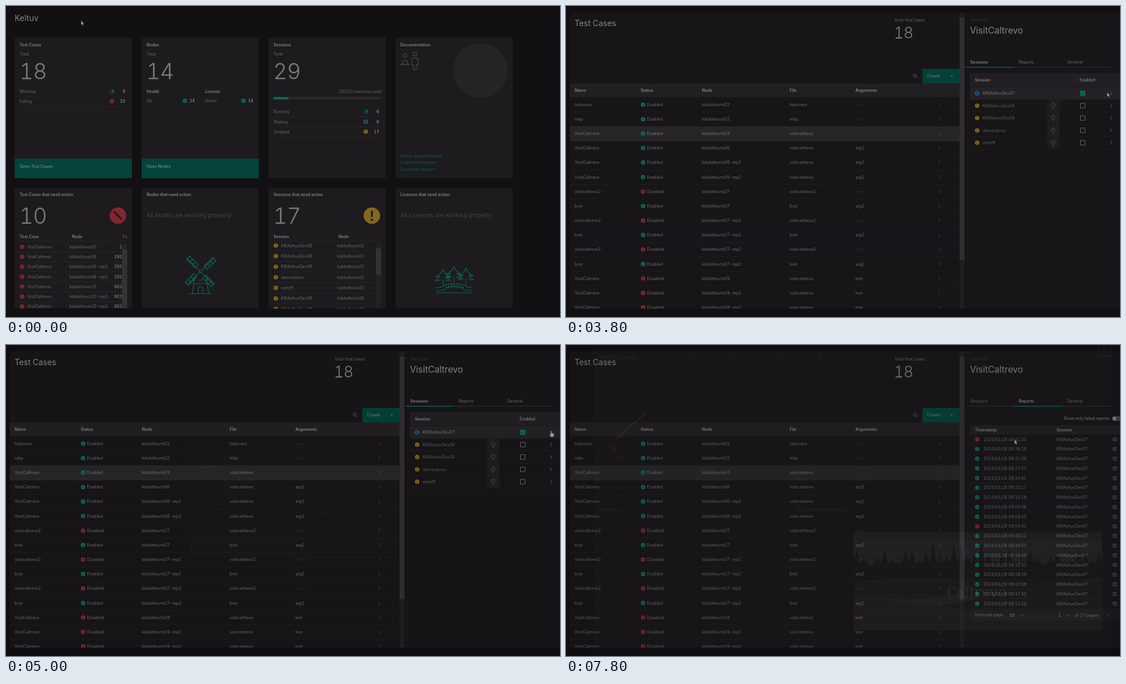
These frames come from a looping animation (960 by 540 pixels, 8 s). An HTML page:

```html
<!DOCTYPE html>
<html lang="en">
<head>
<meta charset="utf-8">
<title>Test case dashboard</title>
<style>
html, body { margin: 0; width: 100%; height: 100%; overflow: hidden; background: #110f12; }
svg { display: block; width: 100vw; height: 100vh; }
text { font-family: Inter, Roboto, sans-serif; font-variant-numeric: tabular-nums; white-space: pre; }
</style>
</head>
<body>
<svg id="stage" viewBox="0 0 960 540" preserveAspectRatio="none"></svg>
<script>
const C = {
  outer: '#110f12', page: '#171518', card: '#1d1b1e', head: '#211f22', line: '#211f22', hover: '#272528',
  grey: '#363437', text: '#6a686b', bright: '#868487', figure: '#7d7b7e', dim: '#464447', faint: '#2c2a2d',
  tile: '#04443a', green: '#044036', onGreen: '#6f827e', mint: '#0b6b53', red: '#84262f', gold: '#83691f', blue: '#2b618f'
};

const rect = (x, y, w, h, fill, extra = '') =>
  `<rect x="${x}" y="${y}" width="${w}" height="${h}" fill="${fill}" ${extra}/>`;
const dot = (x, y, r, fill) => `<circle cx="${x}" cy="${y}" r="${r}" fill="${fill}"/>`;
const path = (d, color, w = 0.8) => `<path d="${d}" fill="none" stroke="${color}" stroke-width="${w}"/>`;
const hline = (x1, x2, y, color = C.line, w = 0.8) => path(`M${x1} ${y}H${x2}`, color, w);

// y is the middle of the capitals
function text(x, y, s, { size = 7.2, fill = C.text, weight = 400, anchor = 'start', extra = '' } = {}) {
  return `<text x="${x}" y="${(y + size * 0.36).toFixed(2)}" font-size="${size}" fill="${fill}" ` +
    `font-weight="${weight}" text-anchor="${anchor}" ${extra}>${s}</text>`;
}
const bold = (x, y, s, opt = {}) => text(x, y, s, { size: 7, weight: 600, fill: C.bright, ...opt });

// large light figure; every 1 stands on a foot
function figure(x, y, s, size) {
  const step = size * 0.585, foot = y + size * 0.345;
  let out = text(x, y, s, { size, weight: 300, fill: C.figure, extra: 'letter-spacing="-.025em"' });
  [...s].forEach((c, i) => {
    const mid = x + step * i + size * 0.32;
    if (c === '1') out += hline(mid - size * 0.19, mid + size * 0.2, foot, C.figure, size * 0.05);
  });
  return out;
}

const tick = (x, y, r = 3.8) => dot(x, y, r, C.mint) + path(`M${x - 1.8} ${y}l1.3 1.4 2.3-2.6`, C.page, 0.8);
const cross = (x, y, r = 3.8) => dot(x, y, r, C.red) + path(`M${x - 1.3} ${y - 1.3}l2.6 2.6m0-2.6l-2.6 2.6`, C.page, 0.7);
const stop = (x, y, r = 3.8) => dot(x, y, r, C.red) +
  path(`M${x - r * 0.5} ${y - r * 0.5}l${r} ${r}`, C.card, r * 0.22);
const warn = (x, y, r = 3.8) => dot(x, y, r, C.gold) + path(`M${x} ${y - r * 0.6}v${r * 0.75}`, C.card, r * 0.22) +
  dot(x, y + r * 0.52, r * 0.15, C.card);
const wait = (x, y) => dot(x, y, 3.8, C.blue) + path(`M${x - 1.6} ${y - 1.8}h3.2M${x - 1.6} ${y + 1.8}h3.2M${x} ${y - 1.8}v3.6`, C.page, 0.7) +
  `<circle cx="${x}" cy="${y}" r="1.7" fill="none" stroke="${C.page}" stroke-width=".6"/>`;
const pie = (x, y) => `<circle cx="${x}" cy="${y}" r="3.5" fill="none" stroke="${C.mint}" stroke-width=".7"/>` +
  `<path d="M${x} ${y - 3.5}A3.5 3.5 0 0 1 ${x + 2.4} ${y + 2.5}L${x} ${y}Z" fill="${C.mint}"/>`;
const chevron = (x, y) => path(`M${x - 1.7} ${y - 3.3}l3.4 3.3-3.4 3.3`, C.text, 0.9);
const caret = (x, y) => path(`M${x - 2.5} ${y - 1.2}l2.5 2.5 2.5-2.5`, C.text, 0.9);

const product = 'Keltuv', place = 'Caltrevo';
const site = 'Visit' + place, siteFile = site.toLowerCase();
const host = id => 'kdzkeltuvts' + id;
const user = n => `KR\\${product}Dev0${n}`;
const guests = ['demo\\demo', 'eee\\fff'];

// windmill with four lattice blades
function windmill() {
  const blade = '<path d="M0-4V-32M-2-11H5.500V-32H-2ZM-2-18H5.500M-2-25H5.500"/>';
  return `<g fill="none" stroke="${C.mint}" stroke-width="1.200"><g transform="translate(337 461)">` +
    [45, 135, 225, 315].map(a => `<g transform="rotate(${a})">${blade}</g>`).join('') + '<circle r="2.500"/></g>' +
    '<path d="M327 470l-4 29M347 470l4 29M318 499.500h38M333 499v-8q0-4 4-4t4 4v8M334 476h6M325 482h24"/></g>';
}

// arched bridge below three firs
function bridge() {
  const fir = (x, y) => `M${x} ${y}q-3 9-12 13 4 1 7-1-3 5-8 8 5 1 9-2M${x} ${y}q3 9 12 13-4 1-7-1 3 5 8 8-5 1-9-2M${x} ${y + 18}v9`;
  const bars = [762, 767, 772, 777, 782, 787, 792].map(x => `M${x} ${483 + (x - 777) ** 2 / 60}V490`).join('');
  return path(fir(757, 457) + fir(776, 452) + fir(797, 455), C.mint, 1.1) +
    path('M745 489q9 0 14-4 18-6 36 0 5 4 13 4M745 494h9q5 0 8-4 15-7 30 0 3 4 8 4h8M745 498h63' + bars, C.mint, 1.1);
}

function dashboard() {
  let o = rect(0, 0, 960, 540, '#121013') + text(15, 21, product, { size: 14, fill: C.bright });
  const xs = [15, 235, 455, 675];
  const tops = ['Test Cases', 'Nodes', 'Sessions', 'Documentation'];
  const lows = ['Test Cases that need action', 'Nodes that need action', 'Sessions that need action', 'Licenses that need action'];
  xs.forEach((x, i) => {
    o += rect(x, 55, 203, 244, C.card) + rect(x, 316, 203, 209, C.card);
    o += bold(x + 8.5, 67, tops[i]) + bold(x + 8.5, 328, lows[i], { size: 6.9 });
    if (i < 3) o += text(x + 8.5, 83, 'Total', { size: 7 }) + figure(x + 8, 113, ['18', '14', '29'][i], 38);
    if (i < 2) o += rect(x, 265, 203, 34, C.tile) + bold(x + 8.5, 278, 'Open ' + tops[i], { fill: C.onGreen });
  });
  const stat = (x, y, label, icon, ix, n, end) => text(x, y, label, { size: 7 }) + icon(ix, y) +
    bold(end, y, n, { anchor: 'end' }) + hline(x, end, y + 8.8, '#29272a');
  o += stat(23.5, 148.3, 'Working', pie, 183.5, 8, 206.5) + stat(23.5, 165.5, 'Failing', stop, 183.5, 10, 206.5);
  o += bold(243.5, 148.3, 'Health') + bold(345, 148.3, 'License');
  o += stat(243.5, 164.6, 'Up', tick, 310, 14, 327) + stat(345, 164.6, 'Active', tick, 411.5, 14, 428.5);
  o += text(650, 148.3, '29/210 sessions used', { size: 7, anchor: 'end' });
  o += rect(463.5, 158, 186.5, 4.2, '#2b292c') + rect(463.5, 158, 26, 4.2, C.mint);
  o += stat(463.5, 183.5, 'Running', pie, 623.5, 6, 646.5) + stat(463.5, 201, 'Waiting', wait, 623.5, 6, 646.5) +
    stat(463.5, 218, 'Stopped', warn, 623.5, 17, 646.5);

  o += dot(822, 112, 47.5, '#252326');
  o += path('M684 101.5h15M687 101v-3.5q0-3 4.500-3t4.500 3v3.500M685 101.500v2M698 101.500v2', '#454346', 1.3) +
    path('M688.500 86a3.200 3.200 0 1 0 6.400 0a3.200 3.200 0 1 0-6.400 0M705.500 83.500a3.200 3.200 0 1 0 6.400 0a3.200 3.200 0 1 0-6.400 0', '#454346', 1.3) +
    path('M706 110v-8h-3v-8q0-4 5.500-4t5.500 4v8h-3v8z', '#454346', 1.3);
  [product + ' documentation', 'LogUva integration', 'Customer support'].forEach((s, i) => {
    o += text(683.5, 260 + 11.5 * i, s, { size: 7, fill: '#0b6050' });
  });

  o += figure(23, 364, '10', 38) + stop(194, 364, 14.3) + figure(463, 364, '17', 38) + warn(634, 364, 14.3);
  o += text(243.5, 363, 'All Nodes are working properly', { size: 10.05, fill: C.dim });
  o += text(683.5, 363, 'All Licences are working properly', { size: 10.05, fill: C.dim });
  o += bold(23.5, 400, 'Test Case') + bold(114, 400, 'Node') + bold(463.5, 400, 'Session') + bold(576, 400, 'Node');
  o += path('M204 397v6m-1.500-4.500l1.500-1.500 1.500 1.500M208 397v6m-1.500-1.500l1.500 1.500 1.500-1.500', C.text, 0.7);
  o += hline(23.5, 210, 408.5, '#29272a') + hline(463.5, 650, 408.5, '#29272a');

  let list = '';
  ['03', '06', '06-rep2', '06-rep1', '10', '10-rep2', '10-rep1'].forEach((id, i) => {
    const y = 418.3 + 17.25 * i;
    list += stop(28, y) + text(37, y, site, { size: 7 }) + text(110, y, host(id), { size: 7 }) +
      bold(201, y, i === 0 ? 1 : i < 4 ? 292 : 803, { anchor: 'end', weight: 500 }) + hline(23.5, 201, y + 8.6, '#29272a');
  });
  [user(6), user(8), user(9), ...guests, user(8), user(8)].forEach((s, i) => {
    const y = 416 + 18.35 * i;
    list += warn(467.5, y) + text(476.5, y, s, { size: 7 }) +
      text(574, y, host(['02', '03', '03', '03', '03', '06', '06'][i]), { size: 7 }) + hline(463.5, 641, y + 9.2, '#29272a');
  });
  list += rect(201, 413, 9, 112, '#242225') + rect(201, 423, 9, 102, '#343235');
  list += rect(641, 411, 9, 114, '#222023') + rect(641, 421, 9, 45.5, '#343235');
  list += path('M204 418.500l1.500-1.500 1.500 1.500M644 416.500l1.500-1.500 1.500 1.500', C.dim, 0.7);
  return o + `<g clip-path="url(#page)">${list}</g>` + windmill() + bridge();
}

// name | node | argument | disabled
const cases = [
  'halmvest|02', 'mkp|02', `${site}|03`, `${site}|06|arg1`, `${site}|06-rep1|arg1`, `${site}|06-rep2|arg1`,
  ...['07', '07-rep1', '07-rep2'].flatMap(n => [`${siteFile}2|${n}||x`, `brat|${n}|arg2`]),
  ...['09', '09-rep1', '09-rep2'].map(n => `${site}|${n}|test|x`)
].map(s => s.split('|'));

function caseTable(cols, right, totalX, selected) {
  const [name, status, node, file, arg, menu] = cols;
  let o = rect(0, 0, 960, 540, C.outer) + rect(6.5, 11, 954, 514.5, C.page);
  o += text(15, 30, 'Test Cases', { size: 13.8, fill: C.bright });
  o += text(totalX, 25, 'Total Test Cases', { size: 6.8 }) + figure(totalX - 1, 46.5, '18', 27);
  o += rect(6.5, 134.5, right - 6.5, 24, C.head);
  ['Name', 'Status', 'Node', 'File', 'Arguments'].forEach((s, i) => o += bold(cols[i], 146.3, s));
  let body = '';
  cases.forEach(([label, id, value, off], i) => {
    const y = 171.3 + 25.15 * i, hot = i === selected;
    const fill = hot ? '#747275' : C.text;
    if (hot) body += rect(6.5, y - 12.4, right - 6.5, 25, C.hover);
    body += hline(6.5, right, y + 12.6, hot ? '#323033' : C.line) + text(name, y, label, { fill }) + (off ? cross : tick)(status + 4, y) +
      text(status + 11, y, off ? 'Disabled' : 'Enabled', { fill }) + text(node, y, host(id), { fill }) +
      text(file, y, label.toLowerCase(), { fill }) + text(arg, y, value || 'none', { fill: value ? fill : C.faint });
    [-2.2, 0, 2.2].forEach(d => body += dot(menu, y + d, 0.6, C.text));
  });
  return o + `<g clip-path="url(#page)">${body}</g>`;
}

const lens = x => `<circle cx="${x}" cy="120.700" r="2.700" fill="none" stroke="${C.text}" stroke-width=".8"/>` +
  path(`M${x + 2} 122.700l2.600 2.600`, C.text, 0.9);
const createButton = (x, w) => lens(x - 13) + rect(x, 109, w, 25.5, C.green) +
  text(x + 8, 121.7, 'Create', { fill: C.onGreen });

const fullList = selected => caseTable([15, 180, 333, 551, 716, 929], 960, 866.5, selected) + createButton(915, 45);

function splitList() {
  return caseTable([15, 129.5, 235.5, 387.5, 501.5, 647], 682, 569, 2) + createButton(617.5, 64.5) +
    path('M666.500 121.700h4M668.500 119.700v4', C.text, 0.8) +
    rect(682, 11, 9, 514.5, '#1e1c1f') + rect(682, 20, 8.5, 421.5, '#302e31') +
    path('M684.500 16l1.700-1.700 1.700 1.700M684.500 520.500l1.700 1.700 1.700-1.700', C.dim, 0.7) +
    rect(691, 11, 269, 514.5, C.page) + path('M691.500 11V525', C.outer, 1) +
    text(700.5, 25, 'Test Case', { size: 6.3, fill: '#39373a' }) + text(700, 42, site, { size: 15.4, fill: C.bright });
}

// lower part of the side panel with its tab row
function panel(active, body) {
  let o = rect(692, 80, 268, 445, C.page);
  ['Sessions', 'Reports', 'General'].forEach((s, i) => {
    const x = 692 + 84 * i;
    o += (i === active ? bold : text)(x + 8.5, 97, s) +
      hline(x, x + 84, 106.3, i === active ? C.mint : '#353336', i === active ? 1.3 : 0.9);
  });
  return o + body;
}

function sessions() {
  let o = rect(700, 116.5, 260, 24, C.head) + bold(708.5, 128.5, 'Session') + bold(890, 128.5, 'Enabled', { weight: 500 });
  [user(7), user(8), user(9), ...guests].forEach((s, i) => {
    const y = 151.6 + 21.45 * i;
    if (i === 0) o += rect(700, y - 10.7, 260, 21, '#232124');
    else o += rect(834, y - 10.5, 21, 20.7, '#1f1d20') + path(`M843.200 ${y + 2.500}q-2-2-2-3.500a3.100 3.100 0 0 1 6.200 0q0 1.500-2 3.500zM843 ${y + 4.300}h2.600`, C.text, 0.7);
    o += (i ? warn : wait)(712.5, y) + text(722, y, s, { fill: i ? '#5c5a5d' : '#7a787b' });
    o += i ? rect(891.5, y - 4, 8, 8, 'none', `stroke="${C.text}" stroke-width=".9"`)
      : rect(891, y - 4.5, 9, 9, C.mint) + path(`M893.200 ${y}l1.700 1.700 3-3.300`, C.page, 0.9);
    o += chevron(944.5, y) + hline(700, 960, y + 10.7);
  });
  return panel(0, o);
}

function general() {
  let o = rect(861, 86.5, 82.5, 19.5, 'none', 'stroke="#918f92" stroke-width="1.200"');
  [['Name', site], ['Node', host('03')], ['File', siteFile], ['Arguments', 'none']].forEach(([label, value], i) => {
    const y = 142.3 + 46.5 * i;
    o += text(700.5, y - 18.7, label, { size: 6.3 }) + rect(700, y - 10.5, 260, 21, '#222023') +
      hline(700, 960, y + 10.5, i === 2 ? C.dim : '#343235') +
      text(708.5, y, value, { fill: i === 2 ? C.bright : i === 3 ? '#353336' : C.dim });
  });
  o += caret(957, 235.3) + rect(700, 325, 133, 33.5, C.grey) + text(709, 339, 'Close', { fill: C.bright }) +
    rect(841, 325, 119, 33.5, C.green) + text(850, 339, 'Save', { fill: C.onGreen });
  return panel(2, o);
}

function reports() {
  const times = ('09:41:33 09:36:18 09:31:08 09:25:57 09:20:41 09:15:27 09:10:16 09:05:06 08:59:55 ' +
    '08:54:33 08:49:22 08:44:03 08:38:49 08:33:32 08:28:19 08:22:56 08:17:40 08:12:24').split(' ');
  let o = text(942, 127.5, 'Show only failed reports', { size: 7, fill: C.bright, anchor: 'end' }) +
    rect(946, 123.5, 17, 8.4, '#444245', 'rx="4.200"') + dot(950.3, 127.7, 3.1, C.bright);
  o += rect(700, 139, 260, 16.5, C.head) + bold(708.5, 147.3, 'Timestamp') + bold(850, 147.3, 'Session');
  times.forEach((s, i) => {
    const y = 164 + 16.77 * i;
    o += (i % 9 ? tick : stop)(712.5, y) + text(723.5, y, '2024/01/26 ' + s, { size: 7 }) + text(850, y, user(7), { size: 7 }) +
      rect(948, y - 2.8, 6, 5.6, 'none', `stroke="${C.text}" stroke-width=".7"`) +
      path(`M949.500 ${y + 1.200}v-2.500h3M951 ${y + 1}h2`, C.text, 0.7) + hline(700, 960, y + 8.4);
  });
  o += rect(700, 459.500, 260, 18.500, '#1c1a1d') + text(708.5, 469, 'Items per page:', { size: 6.9 }) + text(768, 469, '18', { fill: C.bright }) + caret(790, 469) +
    text(853, 469, '1', { fill: C.bright }) + caret(869.500, 469) + text(881.5, 469, 'of 27 pages') +
    path('M941 467l-2 2 2 2', C.text, 0.8);
  // the first row counts as failed, and so does the tenth
  return panel(1, o);
}

function modal() {
  let o = rect(0, 0, 960, 540, '#000', 'opacity=".640"') + rect(318, 167.5, 359, 201.5, C.card);
  o += text(326, 181, 'Session', { size: 6 }) + text(326, 195, user(7), { size: 10.4, fill: C.bright });
  o += path('M661.500 177.500l5 5m0-5l-5 5', C.bright, 0.8);
  o += bold(334.5, 221, 'Workflow') + text(418.5, 221, 'Settings') +
    hline(326, 410, 230.3, C.mint, 1.3) + hline(410, 493, 230.3, '#353336');
  o += rect(334.5, 239, 63.5, 21, '#39373a') + text(341, 249.5, 'Disable', { fill: C.bright }) +
    rect(383, 247, 4.8, 4.8, 'none', `stroke="${C.bright}" stroke-width=".8"`);
  o += rect(404.5, 239, 84.5, 21, '#39373a') + text(411, 249.5, 'Force Disable', { fill: C.bright }) +
    path('M474 247a3.200 3.200 0 1 0 4 0M476 245.500v3.500', C.bright, 0.8);
  o += dot(503.5, 249.5, 3.9, C.bright) + path('M501.700 249.500l1.300 1.400 2.300-2.600', C.card, 0.8) +
    text(512, 249.5, 'Workflow enabled', { fill: C.bright });
  o += rect(334.5, 267, 325.5, 18, '#29272a') + bold(343, 276.3, 'Test Case') + bold(544, 276.3, 'Enabled');
  o += text(343, 294, site) + rect(544, 289.7, 17, 8.4, C.mint, 'rx="4.200"') + dot(557, 294, 3.1, C.bright) +
    path('M555.700 294l1 1 1.600-1.900', C.mint, 0.7) + hline(334.5, 660, 302.8, '#29272a');
  o += rect(318, 336, 180, 33, '#343235') + text(326, 348.7, 'Close', { fill: C.bright }) +
    rect(498, 336.3, 178.5, 32.4, C.tile, 'stroke="#8f9a98" stroke-width=".9"') + text(506, 348.7, 'Save', { fill: C.bright });
  return o;
}

// soft landscape: sky, dark forest, meadow and stream
function landscape() {
  let trees = 'M498 425V372';
  for (let x = 498; x < 929; x += 12) trees += `L${x + 6} ${362 - 14 * Math.sin(x * 0.9) - 8 * Math.sin(x * 0.021)}L${x + 12} 380`;
  return rect(498, 325, 431, 170, '#65686a') + rect(498, 325, 431, 15, '#545255') +
    `<path d="${trees}V425Z" fill="#1e261f"/>` +
    '<path d="M498 412q90-14 200-4t231-4v91H498z" fill="#3c3a2e"/>' +
    '<path d="M498 440q80-8 150 12t281 14v29H498z" fill="#55503a"/>' +
    '<path d="M560 448q70-16 160-10-40 14-90 14t-70-4z" fill="#62645f"/>';
}

function detail() {
  let o = rect(0, 0, 960, 540, '#0c0a0d') + rect(49, 0, 897, 540, C.page);
  o += bold(57, 21, site, { size: 10.4, fill: C.text });
  for (let i = 0; i < 6; i++) o += dot(137 + 76 * i, 21, 3, C.dim) + text(145 + 76 * i, 21, 'Overview', { size: 7, fill: C.dim });
  o += rect(922, -1, 24, 20, 'none', 'stroke="#8b898c"') + path('M931 6l5 5m0-5l-5 5', C.bright);
  o += hline(57, 938, 58) + path('M88 163L138 117', C.text, 3) + stop(83, 180, 5) + text(77, 196, 'Failed');
  o += hline(49, 946, 234) + text(57, 248, 'v1  Transactions', { size: 9 }) + text(57, 286, 'Description') +
    text(402, 286, 'Run   Start performance', { fill: C.bright }) + hline(57, 938, 298) + hline(57, 490, 320, C.dim);
  o += landscape();
  o += `<text x="712" y="438" font-size="26" text-anchor="middle" fill="#a3a1a4" style="font-family:'Noto Serif',serif">${place}</text>`;
  return o + chevron(913, 442);
}

const scenes = {
  dash: dashboard(), list: fullList(4), listPicked: fullList(2), split: splitList() + sessions(),
  modal: modal(), general: general(), reports: reports(), detail: detail()
};
const stage = document.getElementById('stage');
stage.innerHTML = '<clipPath id="page"><rect width="960" height="525.500"/></clipPath>' +
  Object.entries(scenes).map(([id, body]) => `<g id="${id}">${body}</g>`).join('') +
  '<g id="cursor" fill="#9a989b" stroke="#0c0a0d" stroke-width=".4">' +
  '<path id="arrow" d="M0 0V8.300L1.900 6.600 3.300 9.600 4.700 9 3.300 6.100H5.700Z"/>' +
  '<path id="hand" d="M-1 .700Q0-.700 1 .700V4Q2 3.300 2.700 4.200 3.600 3.600 4.200 4.600 5.100 4.300 5.300 5.300V8L4.300 10.800H-.300L-3 7Q-2.700 5.500-1 6.800Z"/></g>';

// linear interpolation through [time, value] points
function ramp(t, points) {
  const i = points.findIndex(p => p[0] > t);
  if (i === 0) return points[0][1];
  if (i < 0) return points[points.length - 1][1];
  const [t0, a] = points[i - 1], [t1, b] = points[i];
  return a + (b - a) * (t - t0) / (t1 - t0);
}

const fades = {
  list: [[1200, 0], [1400, 0.15], [1600, 0.5], [1800, 0.82], [2000, 0.95], [2200, 1]],
  listPicked: [[2600, 0], [2800, 1]],
  split: [[2800, 0], [3000, 0.5], [3200, 0.95], [3400, 1]],
  modal: [[3800, 0], [4000, 0.95], [4200, 1], [4600, 1], [4800, 0.5], [5000, 0.03], [5200, 0]],
  general: [[5200, 0], [5400, 0.6], [5600, 1]],
  reports: [[6000, 0], [6200, 0.6], [6400, 1]],
  detail: [[7600, 0], [7800, 0.13]]
};
const cursorPath = [
  [0, 130, 25], [200, 133, 70], [400, 143, 230], [600, 146, 284], [2400, 146, 284], [2600, 146, 262], [2800, 146, 224],
  [3200, 146, 224], [3400, 330, 207], [3600, 760, 166], [3800, 937.5, 149.5], [4000, 946, 149.5], [4800, 945, 149],
  [5000, 944.5, 149], [5200, 905, 118], [5400, 882, 96], [5800, 882, 96], [6000, 834.5, 96], [6200, 802, 96],
  [6600, 802, 96], [6800, 797, 112], [7000, 782, 150], [7200, 777, 164]
];
const handTimes = [[600, 1400], [4000, 5200], [5400, 6800]];

const el = id => document.getElementById(id);
function draw(time) {
  const t = Math.floor(time % 8000 / 200) * 200;
  for (const id in fades) {
    const a = ramp(t, fades[id]);
    el(id).setAttribute('opacity', a);
    el(id).setAttribute('display', a > 0 ? 'inline' : 'none');
  }
  const x = ramp(t, cursorPath), y = ramp(t, cursorPath.map(p => [p[0], p[2]]));
  el('cursor').setAttribute('transform', `translate(${x} ${y})`);
  const hand = handTimes.some(([a, b]) => t >= a && t < b);
  el('hand').setAttribute('display', hand ? 'inline' : 'none');
  el('arrow').setAttribute('display', hand ? 'none' : 'inline');
}

let start;
function loop(now) {
  start ??= now;
  draw(now - start);
  requestAnimationFrame(loop);
}
draw(0);
requestAnimationFrame(loop);
</script>
</body>
</html>
```
